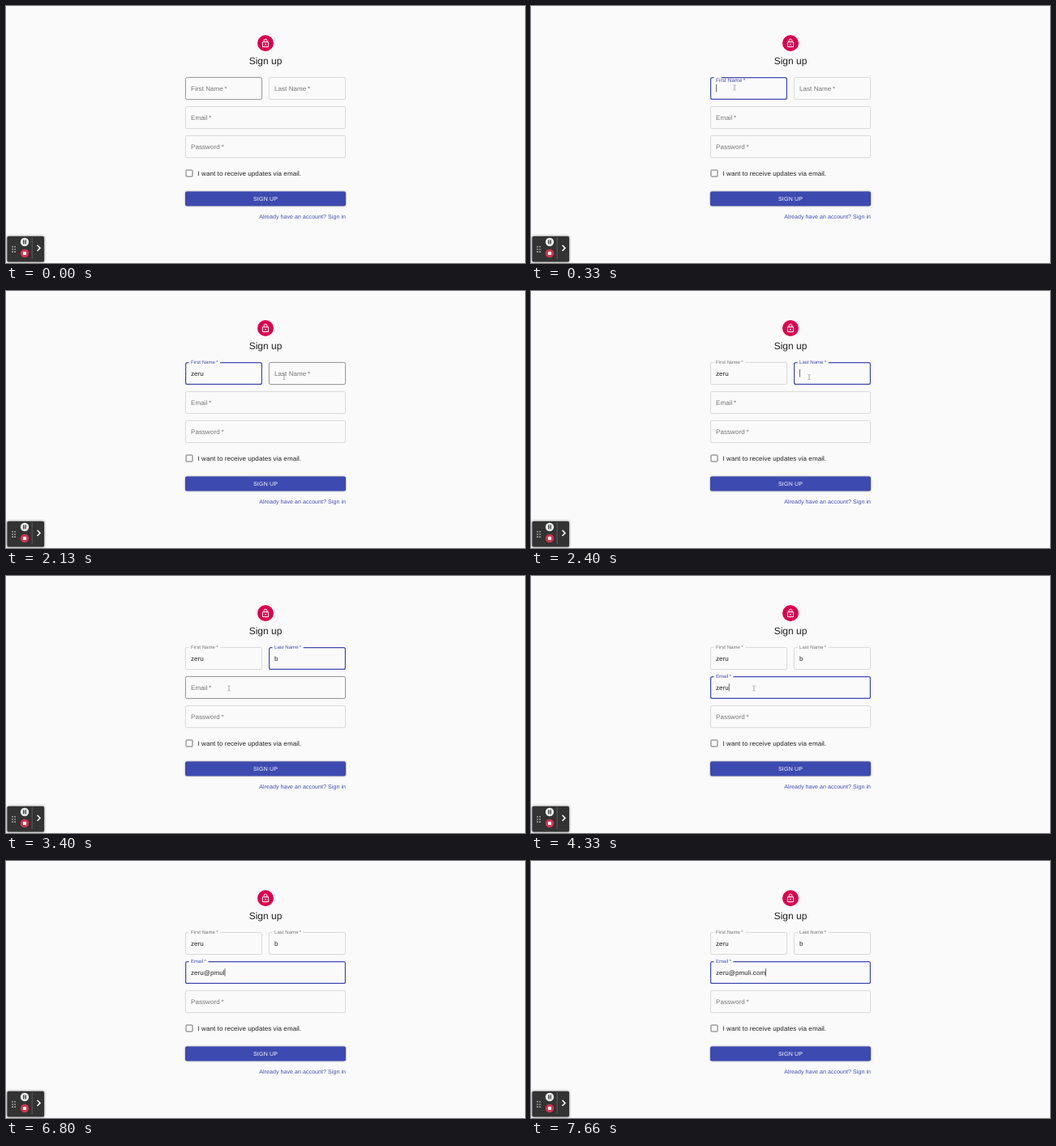
An HTML page that plays this animation: 640x318 px, repeating every 8 s.

```html
<!DOCTYPE html>
<html lang="en">
<head>
<meta charset="utf-8">
<title>Sign up</title>
<style>
  html, body { margin: 0; width: 100%; height: 100%; overflow: hidden; background: #fafafa; }
  svg { display: block; width: 100%; height: 100%; }
  text {
    font: 8px "Liberation Sans", Arial, sans-serif;
    letter-spacing: .00938em;
    text-rendering: geometricPrecision;
    fill: #212121;
    white-space: pre;
  }
  .title { font-size: 12px; letter-spacing: 0; }
  .button { font-size: 7px; letter-spacing: .02857em; fill: #fff; }
  .link { font-size: 7px; letter-spacing: .01071em; fill: #3d4ab0; }
  .line { fill: none; stroke: #fff; }
</style>
</head>
<body>
<svg id="stage" viewBox="0 0 640 318">
  <rect width="640" height="318" fill="#fafafa"/>

  <circle cx="320" cy="46" r="10" fill="#dc004e"/>
  <g transform="translate(314 40) scale(.5)" stroke-width="2">
    <path class="line" d="M5 9h14v12H5zM8 9V6a4 4 0 0 1 8 0v3" stroke-linejoin="round"/>
    <circle cx="12" cy="15" r="2" fill="#fff"/>
  </g>
  <text class="title" x="320" y="72.2" text-anchor="middle">Sign up</text>

  <g id="form"></g>

  <rect x="222" y="203" width="8" height="8" rx=".6" fill="none" stroke="#717171"/>
  <text x="236.5" y="209.7">I want to receive updates via email.</text>

  <rect x="221" y="229.5" width="198" height="18" rx="2" fill="#3d4ab0"
        style="filter: drop-shadow(0 .8px .9px rgba(0,0,0,.4))"/>
  <text class="button" x="320.1" y="241" text-anchor="middle">SIGN UP</text>
  <text class="link" x="419" y="262.9" text-anchor="end">Already have an account? Sign in</text>

  <rect x="1.5" y="285" width="45.5" height="31.5" rx="1.5" fill="#333"
        style="filter: drop-shadow(0 0 1.5px rgba(0,0,0,.65))"/>
  <path d="M8 297.2v8M11 297.2v8" stroke="#ddd" stroke-width="1.4" stroke-dasharray="1.4 1.8"/>
  <circle cx="23" cy="292" r="5.2" fill="#e8ebeb"/>
  <path d="M21.8 289.6v4.8M24.2 289.6v4.8" stroke="#333" stroke-width="1.3"/>
  <circle cx="23" cy="306" r="5.2" fill="#d2344f"/>
  <rect x="21" y="304" width="4" height="4" rx=".4" fill="#fff"/>
  <path d="M32.2 286v27" stroke="#666" stroke-width=".8"/>
  <path class="line" d="M38.6 296l3.4 3.5l-3.4 3.5" stroke-width="1.6"/>

  <g id="pointer" fill="none" stroke="#8c8c8c" stroke-width=".7">
    <path id="beam" d="M-1.6-3Q-.3-3 0-2.3Q.3-3 1.6-3M0-2.3V2.3M-1.6 3Q-.3 3 0 2.3Q.3 3 1.6 3"/>
    <path id="arrow" d="M0 0v6.5l1.6-1.5l1.2 2.6l1-.5l-1.2-2.5h2.2z" fill="#222" stroke="#fff" stroke-width=".4"/>
  </g>
</svg>
<script>
const LOOP = 8000, STEP = 200 / 3;
const BLUE = "#3d4ab0";
const $ = id => document.getElementById(id);

// keys: [time, text typed so far]
const fields = [
  { name: "First Name", x: 221, y: 88, w: 95, focus: 260, blur: 2200,
    keys: [[800, "z"], [860, "ze"], [1060, "zer"], [1200, "zeru"]] },
  { name: "Last Name", x: 324, y: 88, w: 95, focus: 2200, blur: 3530,
    keys: [[2730, "b"]] },
  { name: "Email", x: 221, y: 124, w: 198, focus: 3530, blur: Infinity,
    keys: [[3930, "z"], [4000, "ze"], [4200, "zer"], [4330, "zeru"],
           [6330, "zeru@"], [6530, "zeru@p"], [6660, "zeru@pmu"], [6800, "zeru@pmul"],
           [6930, "zeru@pmuli"], [7200, "zeru@pmuli."], [7400, "zeru@pmuli.c"],
           [7460, "zeru@pmuli.co"], [7660, "zeru@pmuli.com"]] },
  { name: "Password", x: 221, y: 160, w: 198, focus: Infinity, blur: Infinity, keys: [] }
];

// spans in which the caret is blinked off
const caretOff = [[1660, 2200], [3200, 3530], [4930, 5530], [5860, 6330]];

// pointer moves: start, end, from, to
const moves = [
  [1600, 2130, [251, 101], [343, 106.5]],
  [3070, 3380, [343, 106.5], [275, 139]]
];

const clamp = v => Math.min(1, Math.max(0, v));
const mix = (a, b, p) => a + (b - a) * p;
const smooth = p => p * p * (3 - 2 * p);
const easeOut = p => 1 - (1 - p) ** 3;

function add(tag, attrs) {
  const el = document.createElementNS("http://www.w3.org/2000/svg", tag);
  set(el, attrs);
  $("form").append(el);
  return el;
}

function set(el, attrs) {
  for (const key in attrs) el.setAttribute(key, attrs[key]);
}

for (const f of fields) {
  f.border = add("path", { fill: "none" });
  f.label = add("text", {});
  f.label.textContent = f.name + "\u2009*";
  f.value = add("text", { x: f.x + 7, y: f.y + 16.8 });
  f.caret = add("rect", { y: f.y + 9, width: .6, height: 9.5, fill: "#111" });
  f.labelWidth = f.label.getComputedTextLength();
}

// Rounded outline that starts and ends at the label gap
function outline({ x, y, w }, inset, gap) {
  const l = x + inset, t = y + inset, r = x + w - inset, b = y + 28 - inset, c = 2;
  const start = x + 4.5;
  return `M${start + gap} ${t}H${r - c}a${c} ${c} 0 0 1 ${c} ${c}V${b - c}a${c} ${c} 0 0 1 ${-c} ${c}` +
    `H${l + c}a${c} ${c} 0 0 1 ${-c} ${-c}V${t + c}a${c} ${c} 0 0 1 ${c} ${-c}H${start}`;
}

function pointerAt(t) {
  let pos = moves[0][2];
  for (const [start, end, from, to] of moves) {
    if (t < start) break;
    const p = smooth(clamp((t - start) / (end - start)));
    pos = from.map((v, i) => mix(v, to[i], p));
  }
  return pos;
}

function drawField(f, t, [px, py]) {
  const focused = t >= f.focus && t < f.blur;
  const hover = px >= f.x && px <= f.x + f.w && py >= f.y && py <= f.y + 28;
  const lift = easeOut(clamp((t - f.focus) / 200));
  const open = clamp((t - f.focus - 50) / 100);
  const width = focused ? 1.2 : .8;

  set(f.border, {
    d: outline(f, width / 2, open * (f.labelWidth * .75 + 5)),
    stroke: focused ? BLUE : hover ? "#777" : "#d0d0d0",
    "stroke-width": width
  });
  set(f.label, {
    transform: `translate(${f.x + 7} ${f.y + mix(16.8, 2.1, lift)}) scale(${mix(1, .75, lift)})`,
    style: `fill: ${focused ? BLUE : "#757575"}`
  });

  let text = "";
  for (const [time, typed] of f.keys) if (t >= time) text = typed;
  f.value.textContent = text;

  const off = caretOff.some(([a, b]) => t >= a && t < b);
  set(f.caret, {
    x: f.x + 7 + (text ? f.value.getComputedTextLength() : 0),
    opacity: focused && !off ? 1 : 0
  });
  return hover;
}

function draw(time) {
  const t = Math.floor((time % LOOP + 7) / STEP) * STEP;
  const pos = pointerAt(t);
  const over = fields.map(f => drawField(f, t, pos)).some(Boolean);
  set($("pointer"), {
    transform: `translate(${pos})`,
    opacity: t >= 60 && t < 5860 ? 1 : 0
  });
  set($("beam"), { opacity: over ? 1 : 0 });
  set($("arrow"), { opacity: over ? 0 : 1 });
}

const began = performance.now();
function tick() {
  draw(performance.now() - began);
  requestAnimationFrame(tick);
}
tick();
</script>
</body>
</html>
```
